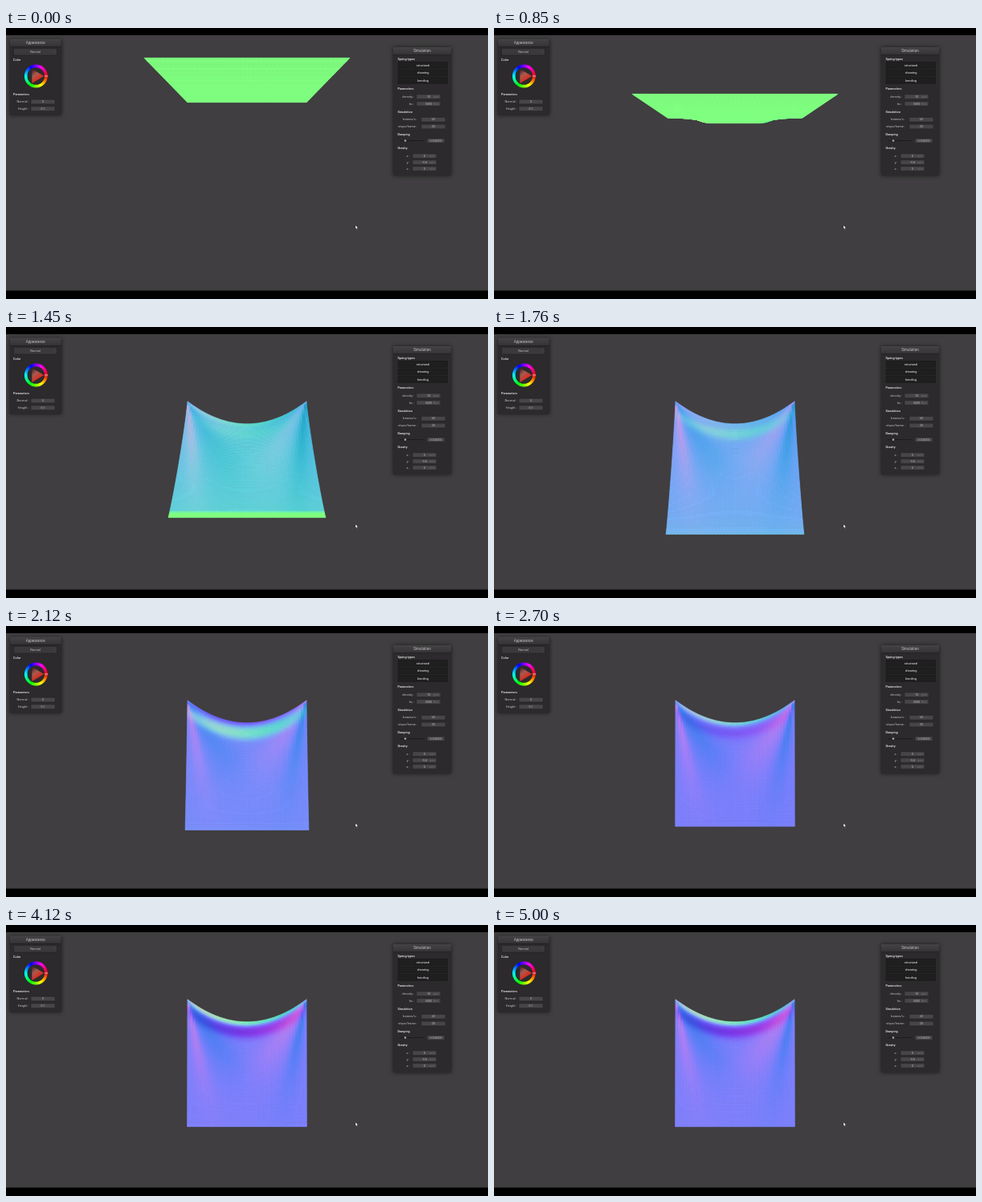
These frames come from a looping animation (600x338 px, 5030 ms). An HTML page with a canvas:

```html
<!DOCTYPE html>
<html lang="en">
<head>
<meta charset="utf-8">
<title>Cloth simulation</title>
<style>
html, body { margin: 0; width: 100%; height: 100%; overflow: hidden; background: #000; }
canvas { display: block; }
</style>
</head>
<body>
<canvas id="stage" width="600" height="338"></canvas>
<script>
const ctx = document.getElementById('stage').getContext('2d');
const LOOP = 5030, COLS = 44, ROWS = 76;
const FOCAL = 351, DEPTH = 2.37, PIN_Y = 0.512;

const clamp = x => Math.max(0, Math.min(1, x));
const smooth = (a, b, x) => { const k = clamp((x - a) / (b - a)); return k * k * (3 - 2 * k); };
const bump = (x, mid, width) => Math.exp(-(((x - mid) / width) ** 2));

// Smooth curve through [time, value] points
function track(...keys) {
  const slope = i => {
    const a = keys[Math.max(0, i - 1)], b = keys[Math.min(keys.length - 1, i + 1)];
    return (b[1] - a[1]) / (b[0] - a[0]);
  };
  return t => {
    if (t <= keys[0][0]) return keys[0][1];
    const i = keys.findIndex(k => k[0] >= t) - 1;
    if (i < 0) return keys[keys.length - 1][1];
    const [t0, v0] = keys[i], [t1, v1] = keys[i + 1];
    const h = t1 - t0, s = (t - t0) / h, r = 1 - s;
    return v0 * r * r * (1 + 2 * s) + v1 * s * s * (3 - 2 * s) +
      h * s * r * (slope(i) * r - slope(i + 1) * s);
  };
}

const reach = track([850, 1], [1000, .96], [1090, .88], [1270, .74], [1450, .58], [1660, .41],
  [1900, .22], [2120, .09], [2500, .02], [3300, 0], [4120, .012], [LOOP, .012]);
const swing = track([1090, .411], [1270, .655], [1450, .864], [1660, 1], [1900, 1.065],
  [2120, 1.07], [2700, 1.06], [3300, 1.067], [LOOP, 1.07]);
const rim = track([1100, 0], [1450, .5], [1800, .2], [2120, -.4], [2700, 1], [3300, 2], [LOOP, 1.8]);
const band = track([1100, 0], [1450, .15], [1800, .6], [2120, 1.2], [2700, -.3], [3300, -.9],
  [4120, -.7], [LOOP, -.7]);
const folds = track([1100, 0], [1450, .55], [2120, .5], [3300, .6], [LOOP, .55]);
const lean = track([1250, 0], [1450, -.25], [1700, -.1], [2120, -.05], [3300, 0]);
const fallen = t => t < 1090 ? .864 * Math.max(0, t / 1000 - .4) ** 2 : swing(t);

// Fold tilt fanning out from one pinned corner
function fan(dx, dy) {
  const angle = Math.atan2(dx, dy + 1e-4);
  return (bump(angle, .2, .11) - .9 * bump(angle, .58, .24)) * bump(Math.hypot(dx, dy), 0, .65);
}

function clothPoint(u, v, p) {
  const r = Math.hypot(.5 - Math.abs(u), v);
  const flat = p.drop * (1 - Math.max(0, 1 - r / p.pull) ** 2);
  const hang = p.drop * (1 - (1 - v) ** 1.1) + .19 * (1 - 4 * u * u) * (1 - v) ** 2;
  const y = PIN_Y - flat - (hang - flat) * p.hung;
  const z = p.reach * v ** (1 + .15 * p.hung);
  const scale = FOCAL / (DEPTH - z);
  return { u, y, z, sx: 300 + u * scale, sy: 168.5 - y * scale };
}

function clothColor(a, b, d, v, top, p) {
  const rise = (b.y - a.y) * COLS, fall = (a.y - d.y) * ROWS, out = (d.z - a.z) * ROWS;
  let n = [-rise * out, out, fall];
  const size = Math.hypot(...n) || 1;
  n = n.map(k => k / size);

  const u = a.u + .5 / COLS, x = 2 * u;
  const below = top - (a.y + d.y) / 2;
  const ridge = (p.rim * bump(below, 0, .03) + p.band * bump(below, .09, .05)) *
    Math.max(0, 1 - x * x) ** .4 / Math.hypot(.8 * x, 1);
  const depth = Math.max(0, PIN_Y - (a.y + d.y) / 2);
  n[0] += p.lean - .8 * x * ridge + p.folds * (fan(u + .5, depth) - fan(.5 - u, depth));
  n[1] += ridge;

  const lip = p.lip * smooth(.94, .97, v);
  n = [n[0] * (1 - lip), n[1] + (1 - n[1]) * lip, n[2] * (1 - lip)];
  const len = Math.hypot(...n) || 1;
  return `rgb(${n.map(k => Math.round(128 + 127 * k / len))})`;
}

function drawCloth(t) {
  const p = {
    drop: fallen(t), reach: reach(t), hung: smooth(950, 1400, t),
    pull: Math.max(.02, .3 * (t - 400) / 450),
    rim: rim(t), band: band(t), folds: folds(t), lean: lean(t),
    lip: smooth(1000, 1300, t) * (1 - smooth(1480, 1680, t))
  };
  const row = j => Array.from({ length: COLS + 1 }, (_, i) => clothPoint(i / COLS - .5, j / ROWS, p));
  const first = row(0);
  let upper = first;
  ctx.lineWidth = .6;
  ctx.lineJoin = 'round';
  for (let j = 0; j < ROWS; j++) {
    const lower = row(j + 1);
    for (let i = 0; i < COLS; i++) {
      const a = upper[i], b = upper[i + 1], c = lower[i + 1], d = lower[i];
      ctx.fillStyle = ctx.strokeStyle =
        clothColor(a, b, d, (j + .5) / ROWS, (first[i].y + first[i + 1].y) / 2, p);
      ctx.beginPath();
      for (const q of [a, b, c, d]) ctx.lineTo(q.sx, q.sy);
      ctx.closePath();
      ctx.fill();
      ctx.stroke();
    }
    upper = lower;
  }
}

function box(x, y, w, h, fill, edge) {
  ctx.fillStyle = fill;
  ctx.fillRect(x, y, w, h);
  if (edge) {
    ctx.strokeStyle = edge;
    ctx.lineWidth = .5;
    ctx.strokeRect(x, y, w, h);
  }
}

function text(str, x, y, align = 'left', size = 4, weight = 400, color = '#c4c2c4') {
  ctx.font = `${weight} ${size}px Roboto, sans-serif`;
  ctx.textAlign = align;
  ctx.textBaseline = 'middle';
  ctx.fillStyle = color;
  ctx.fillText(str, x, y);
}

const heading = (str, x, y) => text(str, x, y, 'left', 3.8, 700, '#d6d4d6');

function panel(x, y, w, h, title) {
  ctx.save();
  ctx.shadowColor = 'rgba(0,0,0,.6)';
  ctx.shadowBlur = 5;
  box(x, y, w, h, '#2c2a2c');
  ctx.restore();
  const shade = ctx.createLinearGradient(0, y, 0, y + 9.5);
  shade.addColorStop(0, '#454345');
  shade.addColorStop(1, '#353335');
  box(x, y, w, 9.5, shade);
  box(x, y + 9.5, w, .6, '#1c1b1c');
  text(title, x + w / 2, y + 5, 'center', 4.5, 400, '#c8c6c8');
}

function field(x, y, value, unit, w = 30) {
  box(x, y - 2.8, w, 5.6, '#474547', '#222122');
  text(value, x + w / 2, y + .2, 'center', 3.6, 400, '#bcbabc');
  if (unit) text(unit, x + w - 9, y + .2, 'left', 3.2, 400, '#777577');
}

function labelled(label, right, x, y, value, unit) {
  text(label, right, y, 'right', 4);
  field(x, y, value, unit);
}

function colorWheel(x, y) {
  const ring = ctx.createConicGradient(0, x, y);
  ['red', 'yellow', 'lime', 'cyan', 'blue', 'magenta', 'red']
    .forEach((c, i) => ring.addColorStop(i / 6, c));
  ctx.strokeStyle = ring;
  ctx.lineWidth = 3.6;
  ctx.beginPath();
  ctx.arc(x, y, 12.6, 0, 7);
  ctx.stroke();
  const tint = ctx.createLinearGradient(x - 4, y - 8, x + 5, y + 4);
  tint.addColorStop(0, '#4a2424');
  tint.addColorStop(.45, '#a95a50');
  tint.addColorStop(1, '#e02618');
  ctx.fillStyle = tint;
  ctx.beginPath();
  ctx.moveTo(x - 5, y - 9);
  ctx.lineTo(x + 10, y);
  ctx.lineTo(x - 5, y + 9);
  ctx.fill();
  box(x + 11, y - .8, 3.4, 1.6, '#ff4a50', '#d8a0a8');
}

function drawAppearance() {
  panel(5, 13.5, 63.5, 95.5, 'Appearance');
  box(9.5, 25.5, 54, 8.5, '#3b393b', '#1e1d1e');
  text('Normal', 36.5, 30, 'center', 3.8);
  text('›', 60, 29.6, 'center', 4, 400, '#8a888a');
  heading('Color', 9, 40);
  colorWheel(37.3, 60);
  heading('Parameters', 9, 82.5);
  labelled('Normal :', 28.5, 31, 92, '0');
  labelled('Height :', 28.5, 31, 100.7, '0.1');
}

function drawSimulation() {
  panel(482, 24, 72, 160, 'Simulation');
  heading('Spring types', 487.5, 38.5);
  ['structural', 'shearing', 'bending'].forEach((name, i) => {
    const y = 42.5 + 9.5 * i;
    box(488, y, 61.5, 7.8, '#201f20', '#151415');
    text(name, 519, y + 4.2, 'center', 3.8, 500, '#d0ced0');
  });
  heading('Parameters', 487.5, 76);
  labelled('density :', 508, 511, 85.7, '10', 'g/m²');
  labelled('ks :', 508, 511, 94.5, '5000', 'N/m');
  heading('Simulation', 487.5, 104.5);
  labelled('frames/s :', 512, 517, 114.2, '60');
  labelled('steps/frame :', 512, 517, 123, '20');
  heading('Damping', 487.5, 133);
  box(491, 140, 29, 1, '#1d1c1d');
  ctx.fillStyle = '#aaa8aa';
  ctx.beginPath();
  ctx.arc(497, 140.5, 1.3, 0, 7);
  ctx.fill();
  field(524, 140.6, '0.004000', '', 22);
  heading('Gravity', 487.5, 150.3);
  ['0', '-9.8', '0'].forEach((value, i) =>
    labelled('xyz'[i] + ' :', 502.5, 506, 159.6 + 7.9 * i, value, 'm/s²'));
}

function drawCursor() {
  ctx.fillStyle = '#fff';
  ctx.strokeStyle = '#222';
  ctx.lineWidth = .4;
  ctx.beginPath();
  for (const [x, y] of [[0, 0], [0, 4.6], [1.1, 3.7], [1.9, 5.4], [2.6, 5], [1.9, 3.4], [3.3, 3.3]])
    ctx.lineTo(435 + x, 246 + y);
  ctx.closePath();
  ctx.fill();
  ctx.stroke();
}

function frame(now) {
  box(0, 0, 600, 338, '#000');
  box(0, 9, 600, 318.5, '#403e40');
  drawCloth(now % LOOP);
  drawAppearance();
  drawSimulation();
  drawCursor();
  requestAnimationFrame(() => frame(performance.now() - start));
}

const start = performance.now();
frame(0);
</script>
</body>
</html>
```
